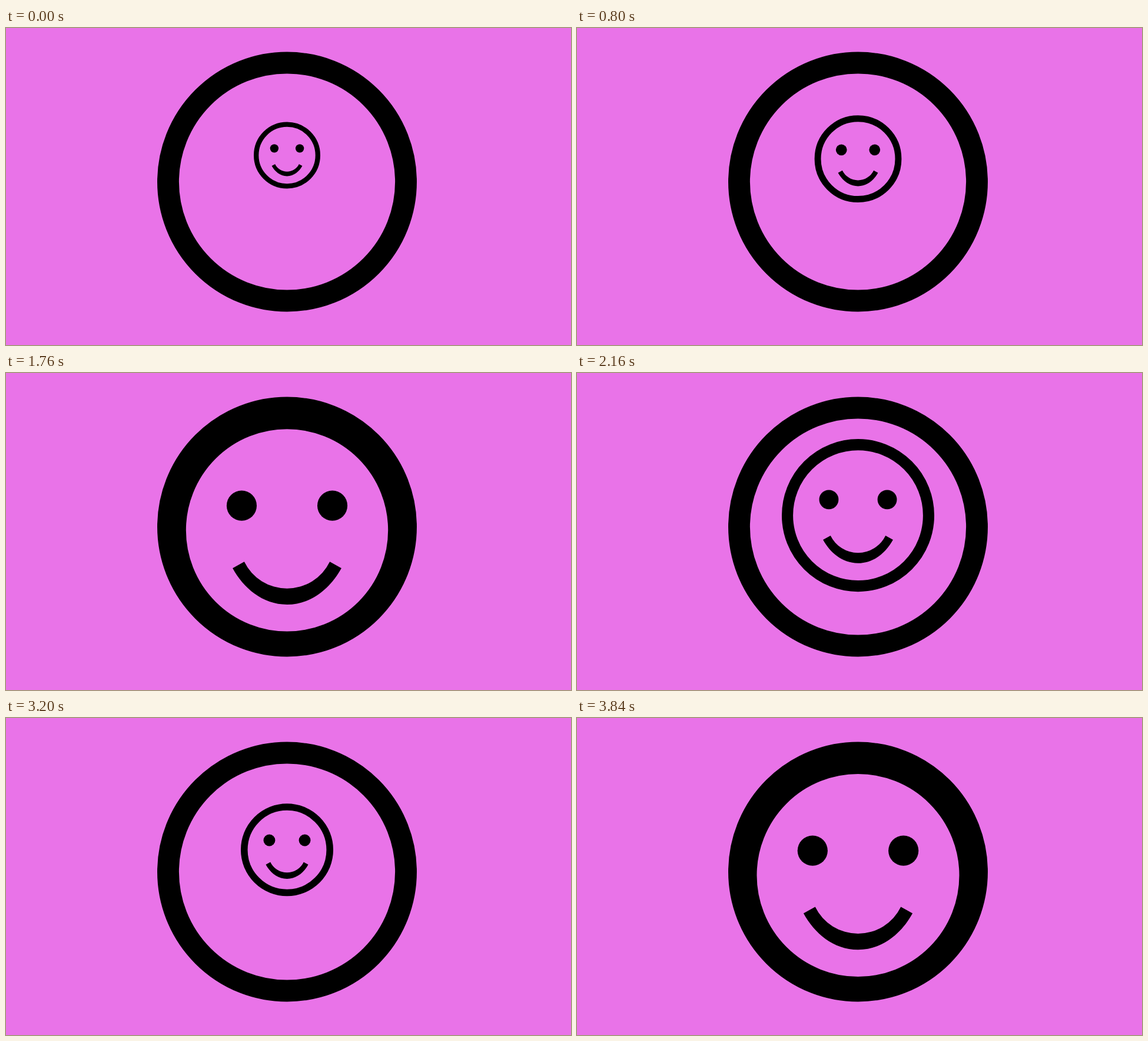
An HTML page without scripts for the animation above (4.08 s loop, 960x538 px).

```html
<!DOCTYPE html>
<html lang="en">
<head>
<meta charset="utf-8">
<title>Growing smiley</title>
<style>
  @property --t { syntax: "<number>"; inherits: true; initial-value: 0; }

  html, body { margin: 0; width: 100%; height: 100%; overflow: hidden; background: #e973e8; }
  svg { display: block; width: 100%; height: 100%; }
  .line { fill: none; stroke: #000; }

  /* --t is the loop time in ms, advanced in 80 ms ticks */
  .face {
    animation: clock 4080ms steps(51) -2ms infinite;

    --drop: clamp(0, 1 - var(--t) / 250, 1);
    --a: clamp(0, (var(--t) - 500) / 950, 1);
    --b: clamp(0, (var(--t) - 1734) / 921, 1);
    --c: clamp(0, (var(--t) - 2877) / 950, 1);

    /* the growing phases lag slightly before easing */
    --a-lag: (var(--a) - 0.25 * var(--a) * var(--a) * (1 - var(--a)));
    --c-lag: (var(--c) - 0.25 * var(--c) * var(--c) * (1 - var(--c)));

    --grow: (var(--a-lag) * var(--a-lag) * (3 - 2 * var(--a-lag)));
    --shrink: (var(--b) * var(--b) * (3 - 2 * var(--b)));
    --regrow: (var(--c-lag) * var(--c-lag) * (3 - 2 * var(--c-lag)));

    --radius: (39 + 17.5 * var(--drop) * var(--drop)
      + 162.8 * (var(--grow) - var(--shrink) + var(--regrow)));
    transform: translate(477.5px, 196.2px) scale(calc(var(--radius) / 201.8));
  }
  @keyframes clock { from { --t: 0; } to { --t: 4080; } }
</style>
</head>
<body>
<svg viewBox="0 0 960 538">
  <circle class="line" cx="477.5" cy="261" r="202.05" stroke-width="36.9"/>
  <g class="face">
    <circle class="line" cy="70.8" r="186.9" stroke-width="29.8"/>
    <circle cx="-77.2" cy="29" r="25.6"/>
    <circle cx="77.2" cy="29" r="25.6"/>
    <path d="M-72.8 124.3A81 81 0 0 0 72.8 124.3L92.6 135.3C74.4 168.6 42 197.1 0 197.1S-74.4 168.6 -92.6 135.3Z"/>
  </g>
</svg>
</body>
</html>
```
